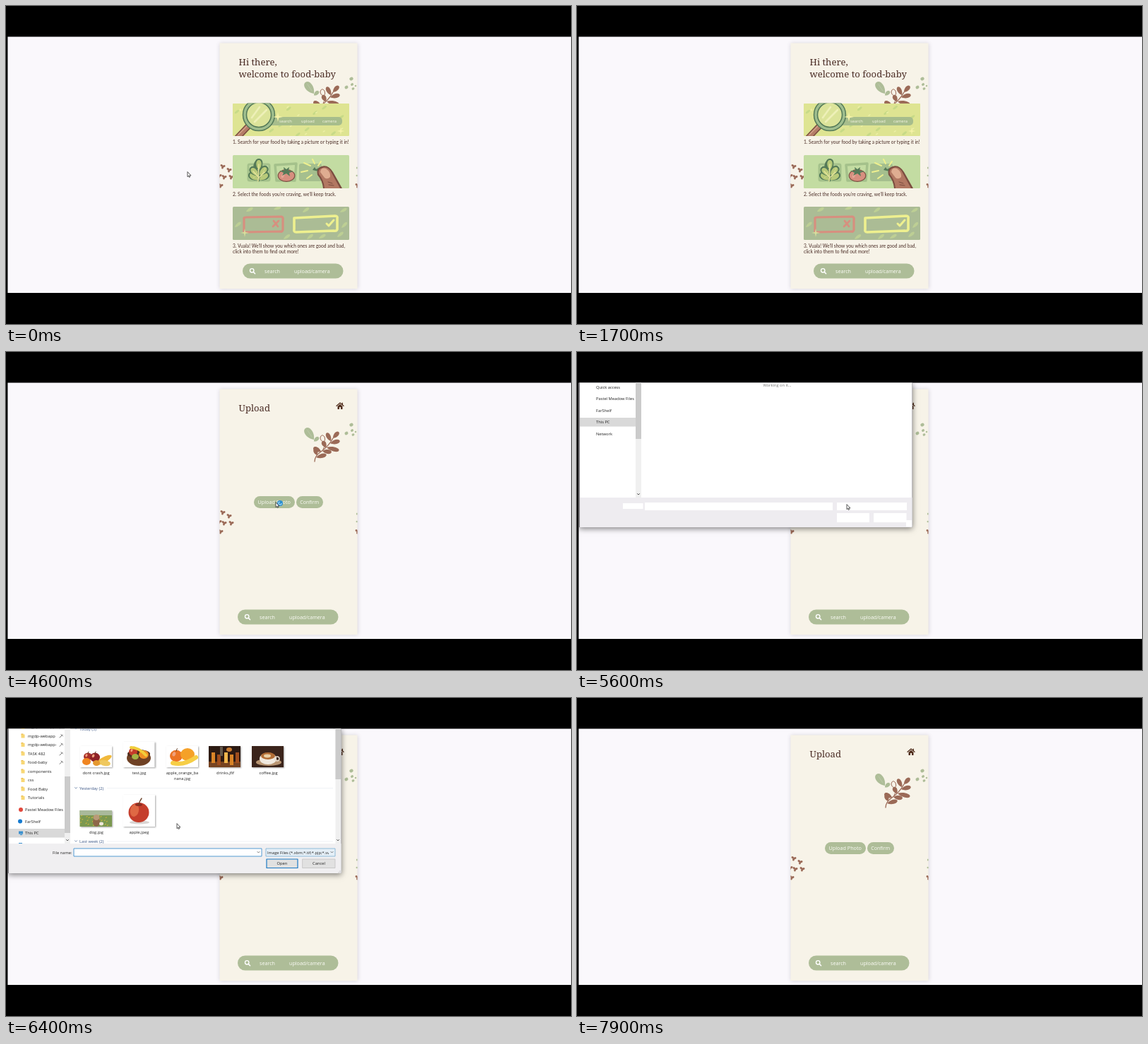
Animation, 800 px wide and 450 px high, one loop 8 s. Source, as an HTML page with a canvas:

```html
<!DOCTYPE html>
<html lang="en">
<head>
<meta charset="utf-8">
<title>Recipe app walkthrough</title>
<style>
html, body { margin: 0; width: 100%; height: 100%; overflow: hidden; background: #000; }
canvas { display: block; width: 800px; height: 450px; }
</style>
</head>
<body>
<canvas id="stage" width="800" height="450"></canvas>
<script>
const ctx = document.getElementById('stage').getContext('2d');
const LOOP = 8000, STEP = 100;
const SERIF = '13.1px "Noto Serif", serif';
const LATO = '6.65px Lato, sans-serif';
const sans = size => size + 'px "Open Sans", sans-serif';
const C = {
  page: '#f7f3e8', sage: '#aebd98', brown: '#9b6a57', ink: '#4a2c25',
  lemon: '#eef08f', dark: '#557a58', line: '#7b4d40', red: '#d78f7f'
};

function text(str, x, y, font, color, align = 'left') {
  ctx.font = font;
  ctx.fillStyle = color;
  ctx.textAlign = align;
  ctx.fillText(str, x, y);
}

function rect(x, y, w, h, color) {
  ctx.fillStyle = color;
  ctx.fillRect(x, y, w, h);
}

function round(x, y, w, h, r, color) {
  ctx.beginPath();
  ctx.roundRect(x, y, w, h, r);
  ctx.fillStyle = color;
  ctx.fill();
}

function frame(x, y, w, h, color, width = 1, r = 0) {
  ctx.beginPath();
  ctx.roundRect(x, y, w, h, r);
  ctx.strokeStyle = color;
  ctx.lineWidth = width;
  ctx.stroke();
}

function oval(x, y, rx, ry, color, angle = 0) {
  ctx.beginPath();
  ctx.ellipse(x, y, rx, ry, angle, 0, Math.PI * 2);
  ctx.fillStyle = color;
  ctx.fill();
}

function ring(x, y, r, color, width) {
  ctx.beginPath();
  ctx.arc(x, y, r, 0, Math.PI * 2);
  ctx.strokeStyle = color;
  ctx.lineWidth = width;
  ctx.stroke();
}

function stroke(path, color, width) {
  ctx.strokeStyle = color;
  ctx.lineWidth = width;
  ctx.lineCap = ctx.lineJoin = 'round';
  ctx.stroke(new Path2D(path));
}

function fill(path, color) {
  ctx.fillStyle = color;
  ctx.fill(new Path2D(path));
}

function clipped(x, y, w, h, draw, r = 0) {
  ctx.save();
  ctx.beginPath();
  ctx.roundRect(x, y, w, h, r);
  ctx.clip();
  draw();
  ctx.restore();
}

// Teardrop leaf growing from its pointed base.
function leaf(x, y, len, width, deg, color) {
  ctx.save();
  ctx.translate(x, y);
  ctx.rotate(deg * Math.PI / 180);
  ctx.beginPath();
  ctx.moveTo(0, 0);
  ctx.bezierCurveTo(len * .4, -width, len, -width * .8, len, 0);
  ctx.bezierCurveTo(len, width * .8, len * .4, width, 0, 0);
  ctx.fillStyle = color;
  ctx.fill();
  ctx.restore();
}

function sparkle(x, y, r, color) {
  ctx.beginPath();
  for (let i = 0; i < 8; i++) {
    const d = i % 2 ? r * .25 : r, a = i * Math.PI / 4;
    ctx.lineTo(x + d * Math.cos(a), y + d * Math.sin(a));
  }
  ctx.fillStyle = color;
  ctx.fill();
}

function flake(x, y) {
  oval(x - 1.6, y - 1.2, 2, 1.5, C.brown, .6);
  oval(x + 1.7, y - .4, 1.9, 1.5, C.brown, -.5);
  oval(x - .4, y + 1.6, 1.4, 2, C.brown, .3);
}

function foliage() {
  leaf(436, 124, 20, 8, -127, C.sage);
  stroke('M427 111L433 120', '#c7d1b4', .6);
  leaf(436, 126.5, 9, 4, -42, C.sage);
  stroke('M437 155Q437 147 446 141Q457 133 463 122', C.brown, 1.3);
  stroke('M449 138Q453 130 450 127Q445 126 445 121Q447 115 451 120Q453 124 450 128', C.brown, 1);
  [[439, 149, 15, -14], [448, 140, 13, 8], [454, 135, 18, 14], [459, 129, 14, -13],
   [463, 122, 12, -48], [460, 126, 13, -117], [453, 135, 10, -118], [446, 141, 12, -153],
   [440, 146, 10, -105]].forEach(([x, y, len, deg]) => leaf(x, y, len, 4.6, deg, C.brown));
  [[489, 103, 2.7], [490, 111, 2.1], [482, 115, 2.6], [491.5, 117, 2], [495, 113, 1.3]]
    .forEach(([x, y, r]) => oval(x, y, r, r * .85, C.sage, -.5));
  [[307, 227], [316, 232], [309, 242], [319, 242], [304, 254], [302, 240], [498, 254]]
    .forEach(([x, y]) => flake(x, y));
  oval(497, 229, 1.2, 1.5, C.sage);
  oval(497, 240, 1.5, 1.3, C.sage);
}

function specks(x, y, w, h, count, color, size) {
  for (let i = 0; i < count; i++) {
    const px = x + (i * 61.8 + 17) % w, py = y + (i * 19.1 + 3) % h;
    oval(px, py, size, size * .4, color, -.65);
  }
}

function searchCard() {
  rect(321, 138, 165, 46, '#dee492');
  specks(323, 139, 161, 44, 15, '#c7da87', 4);
  specks(382, 140, 98, 42, 9, '#edf0a7', 2);
  round(366, 157, 110, 12, 5, '#a7bd8c');
  text('search', 387, 165, sans(5.75), '#f8f7e6');
  text('upload', 418, 165, sans(5.75), '#f8f7e6');
  text('camera', 448, 165, sans(5.75), '#f8f7e6');
  stroke('M346 167L327 187', C.line, 9);
  stroke('M343 170L327 187', '#b47c68', 6);
  stroke('M341 170L329 182', '#d6a68c', 1.2);
  oval(358, 154, 19, 19, '#dce49a');
  stroke('M348 158L359 143M352 164L369 147', '#eef0b8', 2.5);
  ring(358, 154, 20, C.dark, 6.5);
  ring(358, 154, 20, '#9fbe8e', 3.5);
  sparkle(385, 157, 7, '#f5f2a8');
  sparkle(474, 177, 5.5, '#f5f2a8');
  sparkle(332, 147, 3, '#f5f2a8');
}

function selectCard() {
  rect(321, 211, 165, 47, '#c3dca2');
  frame(343, 224, 30, 23, '#a4c18b', 3, 2);
  stroke('M381 225L411 223L409 247L383 247Z', '#a4c18b', 3.5);
  round(415, 223, 32, 25, 3, '#a5bf8e');
  leaf(358, 249, 31, 10, -93, C.dark);
  [[357, 246, -145], [359, 246, -35], [357, 240, -133], [359, 239, -47], [358, 232, -90]]
    .forEach(([x, y, a]) => {
      leaf(x, y, 16, 8, a, C.dark);
      leaf(x, y, 14, 5.5, a, '#b8ca79');
    });
  stroke('M357 248L358 224M357 242L350 234M358 243L366 235', '#e5e49a', 1.6);
  specks(349, 229, 18, 17, 12, '#e5e49a', 1);
  oval(397, 240, 12.4, 9, C.line);
  oval(397, 240, 11.2, 7.8, C.red);
  oval(392, 240, 2, 3.5, '#e5a594', .4);
  fill('M387 233L394 233L393 228L397 231L401 228L400 233L407 234L401 236L402 241L397 237L391 240L393 236Z', C.dark);
  fill('M434 232L437 228L439 231L443 229L442 234Z', C.dark);
  stroke('M422 222L431 226M434 217L437 223M446 220L442 226M418 235L427 233M426 244L433 239', C.lemon, 2);
  fill('M441 239Q439 229 447 227Q456 224 463 235L476 258H449Q448 247 441 239Z', C.line);
  fill('M443 238Q441 231 448 229Q456 226 461 236L473 258H451Q450 246 443 238Z', '#b27862');
  fill('M445 235Q446 228 453 230Q460 235 459 242Q455 246 451 243Z', '#dfad91');
  stroke('M456 249L462 251M457 253L464 254', C.line, 1);
}

function resultCard() {
  rect(321, 284, 165, 47, '#abbc95');
  [[345, 289, -30], [384, 286, -20], [425, 290, -35], [478, 290, -30], [329, 311, -40],
   [398, 328, -35], [431, 328, -38], [448, 327, -30], [474, 325, -40], [480, 312, -45]]
    .forEach(([x, y, a]) => leaf(x - 5, y + 2, 11, 3, a, '#bdcf94'));
  stroke('M337 301Q336 299 340 299L390 298Q393 299 392 303L392 317Q391 320 388 319L339 320Q336 320 337 316Z', C.red, 3.2);
  stroke('M379 304L385 312M386 304L378 312', C.red, 2.8);
  stroke('M408 300L466 297Q470 297 469 301L469 316Q468 319 464 318L411 320Q407 320 408 316Z', C.lemon, 3.6);
  stroke('M454 308L457 311L464 303', C.lemon, 3);
  sparkle(338, 321, 6, '#d8df9d');
}

function searchBar(x, icon) {
  round(x, 364.5, 142.5, 21, 10.5, C.sage);
  if (icon) {
    ring(x + 13.2, 374.3, 2.7, '#fff', 1.4);
    stroke(`M${x + 15.5} 376.6L${x + 17.6} 378.7`, '#fff', 1.5);
  }
  text('search', x + 31, 378, sans(7.15), '#fdfdf8');
  text('upload/camera', x + 73, 378, sans(7.15), '#fdfdf8');
}

function homePage() {
  text('Hi there,', 329.5, 84.3, SERIF, C.ink);
  text('welcome to food-baby', 329.5, 100.5, SERIF, C.ink);
  clipped(321, 137.5, 165, 46.5, searchCard, 1.5);
  clipped(321, 211, 165, 47, selectCard, 1.5);
  clipped(321, 284, 165, 47, resultCard, 1.5);
  text('1. Search for your food by taking a picture or typing it in!', 321, 195, LATO, C.ink);
  text('2. Select the foods you’re craving, we’ll keep track.', 321, 269, LATO, C.ink);
  text('3. Vuala! We’ll show you which ones are good and bad,', 321, 341.7, LATO, C.ink);
  text('click into them to find out more!', 321, 350.3, LATO, C.ink);
  searchBar(335, true);
}

function uploadPage(loaded) {
  text('Upload', 329.5, 84.3, loaded ? SERIF : '13.8px "Liberation Serif", serif', C.ink);
  if (loaded) {
    stroke('M468 76.3L473 72L478 76.3', '#52301f', 1.3);
    fill('M469.5 76.8L473 73.8L476.5 76.8V81H474V78H472V81H469.5ZM475.5 71.8H477V75H475.5Z', '#52301f');
  }
  round(351, 204, 58, 17, 8.5, C.sage);
  round(411, 204, 38, 17, 8.5, C.sage);
  text('Upload Photo', 356.5, 214.9, sans(7.25), '#fdfdf8');
  text('Confirm', 416.2, 214.9, sans(7.1), '#fdfdf8');
  searchBar(328, loaded);
}

function statusBubble() {
  round(302.5, 388, 64, 12, [0, 2, 0, 0], '#1c2735');
  text('Connecting...', 305, 396.2, sans(5.8), '#eef0f3');
}

const ui = (str, x, y, color = '#222', align) => text(str, x, y + 2, sans(5.75), color, align);

function sidebarRow(label, y, x = 27) {
  ui(label, x, y);
}

function folder(label, y, pinned) {
  rect(21.5, y - 3, 3, 2, '#e9b949');
  rect(21.5, y - 2, 5, 5, '#f8d775');
  ui(label, 31, y);
  if (pinned) stroke(`M76 ${y + 2.5}L80 ${y - 1.5}M78 ${y - 2}L80.5 ${y + .5}`, '#777', 1);
}

function sidebar(full) {
  const top = full ? 191 : 99;
  rect(4, top - 6, 79, 12.5, '#d9d9d9');
  if (full) {
    ['mgdp-webapp', 'mgdp-webapp', 'mgdp-webapp-', 'TASK 482', 'food-baby', 'components', 'css', 'Food Baby', 'Tutorials']
      .slice(1).forEach((name, i) => folder(name, 53.5 + i * 12.5, i < 4));
    folder('mgdp-webapp', 41, true);
    rect(18, 188.5, 6, 4, '#3c91cf');
    rect(20, 193, 3, 1, '#3c91cf');
    oval(21, 158, 3, 3, '#e1473c');
    oval(20, 174.5, 3, 3, '#167bd0');
    rect(18, 205, 5, 3, '#3c91cf');
  } else {
    sidebarRow('Quick access', 49.5);
  }
  sidebarRow('Pastel Meadow Files', top - 33);
  sidebarRow('FarShelf', top - 16.5);
  sidebarRow('This PC', top);
  sidebarRow('Network', top + 16.7);
  rect(83, 43, 8, 163, '#f0f0f0');
  rect(83, full ? 111 : 43, 8, 80, '#cbcbcb');
  stroke('M85.5 200.5L87 202L88.5 200.5', '#555', 1);
}

function group(label, y, lineX) {
  stroke(`M97.5 ${y - 1}L99 ${y + .7}L100.5 ${y - 1}`, '#53709a', .7);
  ui(label, 104, y, '#3a5585');
  rect(lineX, y, 463 - lineX, .6, '#e3e7ee');
}

function apple(x, y, r, color) {
  oval(x, y, r, r * .92, color);
  oval(x - r * .35, y - r * .3, r * .25, r * .35, '#f0a07c', .4);
  stroke(`M${x} ${y - r * .75}L${x + r * .15} ${y - r * 1.15}`, '#633d24', 1);
}

function photo(x, y, w, h, color, draw) {
  ctx.save();
  ctx.shadowColor = 'rgba(0,0,0,.35)';
  ctx.shadowBlur = 2;
  ctx.shadowOffsetX = ctx.shadowOffsetY = 1;
  rect(x, y, w, h, color);
  ctx.restore();
  clipped(x, y, w, h, draw);
}

function gallery(selected) {
  group('Today (5)', 43.5, 134);
  group('Yesterday (2)', 127.5, 143);
  group('Last week (2)', 202.7, 143);
  if (selected) {
    rect(160, 134, 57, 61, '#cce8ff');
    frame(160.5, 134.5, 56, 60, '#99d1ff', .8);
  }
  photo(105, 68, 45, 30, '#fff', () => {
    oval(138, 88, 13, 4, '#f1b93c', -.5);
    oval(140, 92, 8, 4, '#efc85e', .2);
    apple(116, 83, 6, '#a8302a');
    apple(126, 84, 7, '#8f2227');
    oval(114, 90, 6, 5, '#f08622');
    oval(128, 92, 5, 4, '#e5982f');
  });
  photo(165.5, 62, 45, 36, '#fff', () => {
    oval(188, 85, 17, 11, '#6f4124');
    oval(188, 79, 16, 6, '#4c2c1c');
    apple(180, 76, 6, '#c33b29');
    oval(195, 80, 7, 6, '#ef9024');
    stroke('M177 70Q188 70 198 81', '#f1ce3b', 4);
    oval(183, 83, 5, 4, '#a4b344');
  });
  photo(227, 68, 45, 30, '#fff', () => {
    apple(241, 82, 9, '#ec7323');
    oval(257, 80, 10, 9, '#f5a128');
    stroke('M236 92Q252 96 269 84', '#f6ce46', 6);
  });
  photo(287, 68, 45, 30, '#2c1a13', () => {
    rect(287, 90, 45, 8, '#764321');
    [291, 299, 309, 317, 325].forEach((x, i) => {
      rect(x, 77 + i % 2 * 3, 5, 15, ['#d98427', '#9f4d1d', '#f0b64d'][i % 3]);
    });
    rect(303, 69, 4, 13, '#65594b');
    oval(316, 73, 4, 3, '#c77b32');
  });
  photo(348, 68, 45, 30, '#3b241b', () => {
    oval(372, 91, 18, 5, '#b89572');
    oval(371, 86, 12, 8, '#f0e9df');
    oval(371, 82, 10, 5, '#b26e36');
    oval(370, 82, 5, 2.4, '#ead0a5');
    ring(384, 86, 3, '#e6dbcd', 1.5);
  });
  photo(104.5, 159, 45.5, 23, '#7b9850', () => {
    rect(104, 159, 46, 7, '#a9b99a');
    specks(105, 166, 44, 15, 24, '#dfb839', 1.3);
    oval(128, 175, 5, 7, '#8d6749');
    oval(128, 169, 4.5, 4, '#b99a78');
    oval(135, 178, 3, 2.4, '#eee6d8');
  });
  photo(165.5, 137, 45.5, 45, '#fff', () => {
    oval(189, 176, 14, 2.5, '#d9d5d3');
    oval(188, 162, 14.5, 14, '#c53e2c');
    oval(182, 159, 6, 9, '#df6944', .2);
    oval(188, 151, 5, 2, '#8c2d22');
    stroke('M188 151Q189 146 192 142', '#6b4229', 1.4);
  });
  ['dont crash.jpg', 'test.jpg', 'apple_orange_ba', 'drinks.jfif', 'coffee.jpg']
    .forEach((name, i) => ui(name, 127.5 + i * 61, 106, '#222', 'center'));
  ui('nana.jpg', 249.5, 114, '#222', 'center');
  ui('dog.jpg', 128, 189.8, '#222', 'center');
  ui('apple.jpeg', 188.5, 189.8, '#222', 'center');
  rect(466.5, 43, 7.5, 163, '#f0f0f0');
  rect(466.5, 43, 7.5, 72, '#cbcbcb');
  stroke('M468.5 200.5L470 202L471.5 200.5', '#555', 1);
}

function dialogFooter(full, selected) {
  rect(4, 206, 470.5, 42, full ? '#f0eff1' : '#eeecf0');
  if (!full) {
    rect(65, 214, 28.5, 8, '#fff');
    rect(96, 213, 266, 11, '#fff');
    rect(368, 213, 99, 11, '#fff');
    rect(368, 228, 46, 13, '#fff');
    rect(420, 228, 46.5, 13, '#fff');
    rect(466, 238, 8, 9, '#fff');
    return;
  }
  ui('File name:', 93.5, 218.5, '#222', 'right');
  rect(96, 213, 266, 11, '#fff');
  frame(96, 213, 266, 11, '#3f8fce', .9);
  if (selected) ui('apple.jpeg', 98, 218.5);
  rect(368, 213, 98, 11, '#e5eff7');
  frame(368, 213, 98, 11, '#79aed2', .8);
  clipped(369, 213, 88, 11, () => ui('Image Files (*.xbm;*.tif;*.pjp;*.sv', 370, 218.5));
  stroke('M356 217.5L357.5 219L359 217.5M460 217.5L461.5 219L463 217.5', '#555', .8);
  rect(369, 228, 44, 12.5, '#e1e1e1');
  frame(369, 228, 44, 12.5, '#1d7ac4', 1.2);
  rect(420, 228, 46, 12.5, '#e1e1e1');
  frame(420, 228, 46, 12.5, '#bcbcbc', .7);
  ui('Open', 391, 234.3, '#222', 'center');
  ui('Cancel', 443, 234.3, '#222', 'center');
  [[472.5, 246.5], [470.5, 246.5], [472.5, 244.5]].forEach(([x, y]) => rect(x, y, 1, 1, '#aaa'));
}

function fileDialog(full, selected) {
  ctx.save();
  ctx.shadowColor = 'rgba(0,0,0,.5)';
  ctx.shadowBlur = 8;
  ctx.shadowOffsetY = 2;
  rect(3, 43, 472, 205, '#77757a');
  ctx.restore();
  rect(4, 43, 470.5, 204.5, '#fff');
  clipped(4, 43, 470, 163, () => {
    sidebar(full);
    if (full) gallery(selected);
    else ui('Working on it...', 283.5, 47, '#777', 'center');
  });
  dialogFooter(full, selected);
}

// Separate pointer runs; the pointer is hidden between them.
const RUNS = [
  [[0, 257, 235], [300, 345, 146], [600, 350, 232], [900, 456, 340], [1200, 430, 210], [1600, 490, 78]],
  [[1900, 546, 100], [2600, 414, 366], [2800, 414, 366]],
  [[3700, 407, 266], [4000, 382, 213], [4900, 382, 213], [5000, 382, 216], [6000, 382, 216],
   [6400, 242, 178], [6700, 190, 165], [6900, 190, 165], [7300, 391, 233], [7400, 391, 233]]
];

function pointerAt(t) {
  const run = RUNS.find(r => t >= r[0][0] && t <= r.at(-1)[0]);
  if (!run) return null;
  const i = Math.max(1, run.findIndex(k => k[0] >= t));
  const [t0, x0, y0] = run[i - 1], [t1, x1, y1] = run[i];
  const p = (t - t0) / (t1 - t0), e = p * p * (3 - 2 * p);
  return [x0 + (x1 - x0) * e, y0 + (y1 - y0) * e];
}

function pointer(t) {
  const at = pointerAt(t);
  if (!at) return;
  const [x, y] = at;
  if (t >= 4600 && t < 5200) {
    oval(x + 6, y + 1, 4, 4, '#2e8fd0');
    const a = t < 4700 ? 0 : 1.2;
    ctx.beginPath();
    ctx.arc(x + 6, y + 1, 2, a, a + 4.5);
    ctx.strokeStyle = '#a9dcf5';
    ctx.lineWidth = 1.2;
    ctx.stroke();
  }
  ctx.save();
  ctx.translate(x, y);
  const arrow = 'M0 0V6.7L1.5 5.3L2.5 7.5L3.5 7L2.6 4.9H4.6Z';
  fill(arrow, '#fff');
  stroke(arrow, '#222', .75);
  ctx.restore();
}

function render(t) {
  rect(0, 0, 800, 450, '#000');
  rect(2.4, 43.5, 797.6, 362.5, '#faf8fc');
  clipped(2.4, 43.5, 797.6, 362.5, () => {
    ctx.save();
    ctx.shadowColor = 'rgba(60,50,70,.2)';
    ctx.shadowBlur = 6;
    rect(302.5, 52.5, 195, 347.5, C.page);
    ctx.restore();
    clipped(302.5, 52.5, 195, 347.5, () => {
      foliage();
      if (t < 2900) homePage();
      else uploadPage(t >= 3400);
      if (t >= 2700 && t < 3400) statusBubble();
    });
    if (t >= 5400 && t < 7500) fileDialog(t >= 6000, t >= 6700);
    pointer(t);
  });
}

const start = performance.now();
function tick() {
  const t = (performance.now() - start) % LOOP;
  render(Math.floor(t / STEP) * STEP);
  requestAnimationFrame(tick);
}
tick();
</script>
</body>
</html>
```
